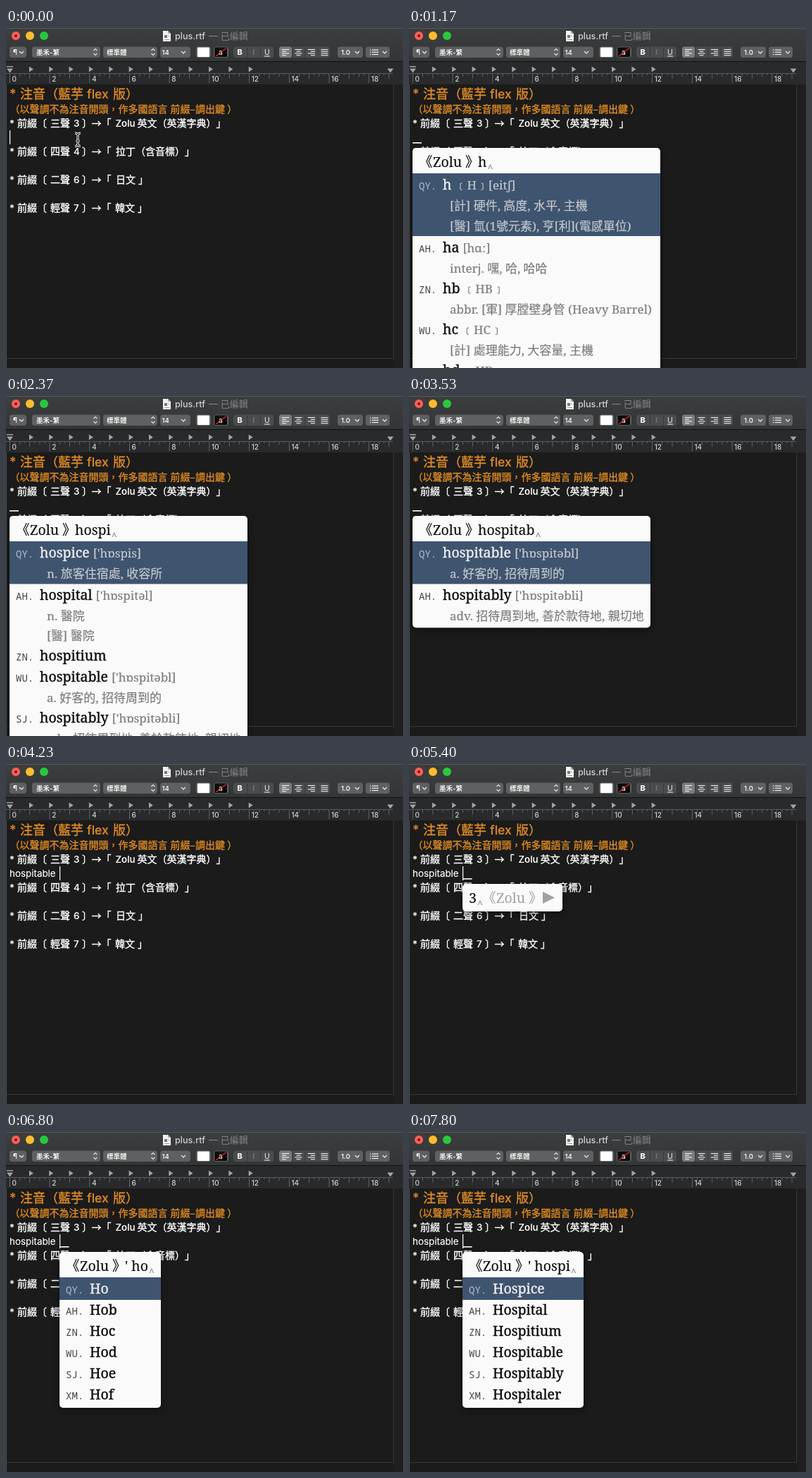
An HTML page for the animation above (8 s loop, 564 by 482 pixels).

```html
<!DOCTYPE html>
<html lang="zh-Hant">
<head>
<meta charset="utf-8">
<style>
html, body { margin: 0; width: 100%; height: 100%; overflow: hidden; background: #1b1b1b; }
svg { display: block; width: 564px; height: 482px; }
text { white-space: pre; text-spacing-trim: space-all; stroke-width: 0; }
.ui { font-family: Inter, 'Noto Sans CJK TC', 'Noto Sans CJK', sans-serif; }
.doc { font: 500 13.4px Inter, 'Noto Sans CJK TC', 'Noto Sans CJK', sans-serif; stroke-width: .15px; }
.cjk { font: 500 14px 'Noto Sans CJK TC', 'Noto Sans CJK', sans-serif; stroke-width: .35px; }
.pop { font-family: 'Noto Serif', 'Noto Sans CJK TC', 'Noto Sans CJK', serif; font-size: 19.5px; stroke-width: .1px; }
.word { stroke-width: .35px; }
.note { font-size: 17px; stroke-width: .2px; }
.key { font: 14px 'Noto Sans Mono', monospace; }
</style>
</head>
<body>
<svg id="stage" viewBox="0 0 564 482"></svg>
<script>
const NAME = 'Zolu';
const KEYS = ['QY.', 'AH.', 'ZN.', 'WU.', 'SJ.', 'XM.'];
const LOOP = 8000;

const rect = (x, y, w, h, fill, r = 0) =>
  `<rect x="${x}" y="${y}" width="${w}" height="${h}" rx="${r}" fill="${fill}"/>`;
const path = (d, stroke, width = 1, fill = 'none') =>
  `<path d="${d}" stroke="${stroke}" stroke-width="${width}" fill="${fill}"/>`;
const shape = (d, fill) => `<path d="${d}" fill="${fill}"/>`;
const text = (x, y, s, cls, fill, extra = '') =>
  `<text x="${x}" y="${y}" class="${cls}" fill="${fill}" stroke="${fill}" ${extra}>${s}</text>`;
const range = n => [...Array(n).keys()];

// ---- window ----
const down = x => path(`M${x - 3} 33l3 3l3-3`, '#e4e4e4', 1.3);
const upDown = x => path(`M${x - 2.5} 32l2.5-2.5l2.5 2.5M${x - 2.5} 36l2.5 2.5l2.5-2.5`, '#e4e4e4', 1.2);
const pill = (x, end, fill = '#5f6061') => rect(x, 26.5, end - x, 15.5, fill, 3.5);
const label = (x, s, size = 9.5, extra = '') =>
  text(x, 37.8, s, 'ui', '#f2f2f2', `font-size="${size}" font-weight="600" ${extra}`);

function titleBar() {
  const lights = ['#ff5f57', '#febc2e', '#28c840']
    .map((c, i) => `<circle cx="${14 + 20 * i}" cy="11" r="6" fill="${c}"/>`).join('');
  return `<defs><linearGradient id="bar" x2="0" y2="1">
    <stop stop-color="#3c3d3e"/><stop offset="1" stop-color="#343536"/></linearGradient></defs>` +
    rect(0, 0, 564, 48, 'url(#bar)') + rect(0, 0, 564, 1, '#58595a') +
    lights + '<circle cx="14" cy="11" r="2" fill="#7c120c"/>' +
    shape('M223 4h7l4 4v11h-11z', '#f2f2f2') + shape('M230 4v4h4z', '#aaa') +
    rect(225, 10, 4, 4, '#777') + path('M225 16.5h7M230 11.5h2', '#999') +
    text(240, 15.8, 'plus.rtf', 'ui', '#d2d2d2', 'font-size="12.6" font-weight="500"') +
    text(288, 15.8, '— 已編輯', 'ui', '#828384', 'font-size="13"');
}

function alignIcon(x, kind) {
  return range(4).map(i => {
    const w = i % 2 && kind < 3 ? 6 : 10;
    const dx = [0, (10 - w) / 2, 10 - w, 0][kind];
    return rect(x + dx, 30 + i * 2.7, w, 1.1, '#eee');
  }).join('');
}

function toolBar() {
  return pill(5, 29) + label(10, '¶', 10) + down(22) +
    pill(37, 134) + label(43, '墨禾-繁') + upDown(127) +
    pill(138, 215) + label(143, '標準體') + upDown(209) +
    pill(219, 262) + label(221.5, '14') + down(252) +
    pill(270, 291) + rect(272, 27.5, 17, 13.5, '#fff', 1) +
    pill(295, 316) + rect(296.5, 27.5, 17.5, 13.5, '#0b0b0b', 1) +
    label(302, 'a', 10) + path('M298 40l15-11.5', '#e0372c', 1.2) +
    pill(323, 380, '#4b4c4d') + rect(342, 27, 1, 15, '#38393a') + rect(361, 27, 1, 15, '#38393a') +
    label(328.5, 'B', 11, 'style="font-weight:800"') +
    text(350, 38, 'I', 'ui', '#858687', 'font-size="11" font-style="italic"') +
    text(367, 37.6, 'U', 'ui', '#eee', 'font-size="10.5"') + rect(367, 39.5, 8, 1, '#eee') +
    pill(388, 460, '#4b4c4d') + pill(388, 406, '#7b7c7d') +
    range(4).map(i => alignIcon(392 + i * 18.5, i)).join('') +
    range(3).map(i => rect(406 + i * 18.3, 27, 1, 15, '#38393a')).join('') +
    pill(471, 507) + label(476, '1.0') + down(499) +
    pill(511, 545) +
    range(3).map(i => rect(517, 30.5 + i * 3.2, 1.5, 1.3, '#eee') + rect(520, 30.5 + i * 3.2, 9, 1.2, '#eee')).join('') +
    down(538);
}

function ruler() {
  const cm = 28.35, grey = '#a2a3a4';
  let out = rect(0, 47, 564, 1, '#111') + rect(0, 48, 564, 32, '#292a2b') +
    rect(0, 64, 550, 1, '#595a5b');
  for (let i = 0; i <= 76; i++) {
    const len = i % 8 ? (i % 4 ? (i % 2 ? 2 : 4) : 7) : 13;
    out += rect((5 + i * cm / 4).toFixed(1), 65, 0.8, len, '#707172');
  }
  for (let i = 0; i < 10; i++)
    out += text(8.5 + i * 2 * cm, 76, i * 2, 'ui', '#d4d4d4', 'font-size="10" font-weight="500"');
  for (let i = 1; i <= 12; i++)
    out += shape(`M${5 + i * cm - 0.5} 54.5l6 4l-6 4z`, grey);
  return out + rect(1, 54, 9, 1.5, grey) + shape('M1 57.5h9l-4.5 6z', grey) +
    shape('M541.5 57.5h9l-4.5 6z', grey);
}

function prefixLine(y, tone, parts) {
  const cjk = (x, s) => text(x, y, s, 'cjk', '#fff');
  return text(5, y, '*', 'doc', '#fff') + cjk(16, '前綴〔') + cjk(63, tone[0]) +
    text(96, y, tone[1], 'doc', '#fff') + cjk(108, '〕') + cjk(121.5, '→') + cjk(135.5, '「') + parts;
}

function page() {
  const orange = '#e08b24', cjk = (x, y, s) => text(x, y, s, 'cjk', '#fff');
  const big = 'style="font-size:18px"';
  return rect(0, 80, 564, 402, '#1b1b1b') + rect(551, 80, 13, 402, '#1f1f1f') +
    rect(550, 80, 1, 389, '#363636') + rect(0, 468, 551, 1, '#363636') +
    text(5, 100, '*', 'doc', orange, big) + text(20, 99.5, '注音（藍芋', 'cjk', orange, big) +
    text(115, 99.5, 'flex', 'doc', orange, 'style="font-size:17.5px"') +
    text(152, 99.5, '版）', 'cjk', orange, big) +
    text(5.5, 120, '（以聲調不為注音開頭，作多國語言', 'cjk', orange) +
    text(233.5, 120, '前綴–調出鍵 ）', 'cjk', orange) +
    prefixLine(140, ['三聲', 3], text(155.5, 140, NAME, 'doc', '#fff') + cjk(186.5, 140, '英文（英漢字典）」')) +
    prefixLine(180, ['四聲', 4], cjk(156, 180, '拉丁（含音標）」')) +
    prefixLine(220, ['二聲', 6], cjk(156, 220, '日文') + cjk(188, 220, '」')) +
    prefixLine(260, ['輕聲', 7], cjk(155, 260, '韓文') + cjk(187, 260, '」')) +
    rect(0, 0, 1, 482, '#4a4b4c');
}

// ---- candidate popup; entry: [word, comment, ...definitions] ----
const hospital = ['hospital', "['hɒspitəl]", 'n. 醫院', '[醫] 醫院'];
const hospice = ['hospice', "['hɒspis]", 'n. 旅客住宿處, 收容所'];
const hospitable = ['hospitable', "['hɒspitəbl]", 'a. 好客的, 招待周到的'];
const hospitably = ['hospitably', "['hɒspitəbli]", 'adv. 招待周到地, 善於款待地, 親切地'];
const hospitium = ['hospitium', ''];
const plain = s => s.split(' ').map(w => [w, '']);

const hList = [
  ['h', '﹝H﹞[eitʃ]', '[計] 硬件, 高度, 水平, 主機', '[醫] 氫(1號元素), 亨[利](電感單位)'],
  ['ha', '[hɑː]', 'interj. 嘿, 哈, 哈哈'],
  ['hb', '﹝HB﹞', 'abbr. [軍] 厚膛壁身管 (Heavy Barrel)'],
  ['hc', '﹝HC﹞', '[計] 處理能力, 大容量, 主機'],
  ['hd', '﹝HD﹞', '[計] 硬碟']];
const hoList = [
  ['ho', '[həu]', 'interj. 嗬, 嗨'], ['hoar', '[hɔː]', 'a. 灰白的', 'n. 白霜'],
  ['hoard', '[hɔːd]', 'n. 儲藏, 貯藏物'], ['hoarse', '[hɔːs]', 'a. 嘶啞的, 刺耳的']];
const hosList = [
  ['hose', '[həuz]', 'n. 長統襪, 軟管', 'vt. 用軟管澆水'], ['hosier', "['həuziə]", 'n. 襪商'],
  ['hosiery', "['həuziəri]", 'n. 襪類, 針織品'], hospice];
const hospList = [hospice, hospital, hospitium, hospitable, hospitably];
const capsList = plain('Hospice Hospital Hospitium Hospitable Hospitably Hospitaler');

// start time, x, width, input, entries; an empty input shows the prefix hint
const states = [
  [0],
  [470, 5, 142, ''],
  [970, 5, 352, 'h', hList],
  [1700, 5, 300, 'ho', hoList],
  [1930, 5, 300, 'hos', hosList],
  [2130, 5, 338, 'hosp', hospList],
  [2340, 5, 338, 'hospi', hospList],
  [2600, 5, 338, 'hospit', [hospital, hospitium, hospitable, hospitably, ['hospitaler', '']]],
  [2950, 5, 338, 'hospita', [hospital, hospitable, hospitably, ['hospitaler', ''], ['hospitalism', '', 'n. 醫院制度']]],
  [3430, 5, 338, 'hospitab', [hospitable, hospitably]],
  [3740, 5, 338, 'hospitabl', [hospitable, hospitably]],
  [4000, 5, 252, 'hospitable', [hospitable]],
  [4230],
  [5370, 76, 142, ''],
  [5970, 76, 144, "'", plain('A Ab Ac Ad Ae Af')],
  [6530, 76, 144, "' h", plain('H Ha Hb Hc Hd He')],
  [6750, 76, 144, "' ho", plain('Ho Hob Hoc Hod Hoe Hof')],
  [6970, 76, 152, "' hos", plain('Hos Hosana Hose Hosea Hosed Hosel')],
  [7200, 76, 172, "' hosp", capsList],
  [7570, 76, 172, "' hospi", capsList]];

const mark = '<tspan dy="6.5" dx="1" font-size="14" fill="#888">^</tspan>';
const ink = '#0a0a0a';

function candidate(x, y, key, [word, comment, ...defs], on) {
  const soft = on ? '#c3c8ce' : '#7c7c7c';
  const bar = on ? rect(x, y - 1, '100%', 32 + defs.length * 28.5, '#3f546f') : '';
  return bar + text(x + 9, y + 22, key, 'key', on ? '#b4bdc8' : '#444') +
    text(x + 43, y + 22,
      `${word}<tspan class="note" dx="5" fill="${soft}" stroke="${soft}">${comment}</tspan>`,
      'pop word', on ? '#f0f0f0' : ink) +
    defs.map((d, k) => text(x + 53, y + 51 + k * 28.5, d, 'pop note', soft)).join('');
}

function popup([, x, w, input, list = []]) {
  if (!x) return '';
  let body = '', y = 207;
  list.forEach((entry, i) => {
    body += candidate(x, y, KEYS[i], entry, !i);
    y += 30 + (entry.length - 2) * (i ? 28 : 29.5);
  });
  const quote = (qx, fill) => text(qx, 197, '《', 'pop', fill) +
    text(qx + 20, 197, NAME, 'pop', fill) + text(qx + 66, 197, '》', 'pop', fill);
  const head = input
    ? quote(x + 9, ink) + text(x + 93, 197, input + mark, 'pop', ink)
    : text(x + 9, 197, '3' + mark, 'pop', ink) + quote(x + 28, '#a6a6a6') +
      shape(`M${x + 114} 181l17 8.5l-17 8.5z`, '#a0a0a0');
  const h = (list.length ? y + 4 : 209) - 170;
  return `<clipPath id="clip">${rect(x, 170, w, h, '#fff', 5)}</clipPath>
    <g style="filter:drop-shadow(0 3px 5px rgba(0,0,0,.45))">${rect(x, 170, w, h, '#fafafa', 5)}</g>
    <g clip-path="url(#clip)">${body}${head}</g>`;
}

// ---- animation ----
const beam = 'M98 149q4 0 4 3.5v11.5q0 3.5-4 3.5M106 149q-4 0-4 3.5M102 164q0 3.5 4 3.5M99.5 160h5';
const stage = document.getElementById('stage');
stage.innerHTML = page() + titleBar() + toolBar() + ruler() +
  `<g id="typed">${text(5, 160, 'hospitable', 'doc', '#fff', 'style="font-weight:400"')}</g>
  <rect id="caret" y="145" width="1.2" height="20" fill="#fff"/>
  <rect id="under" y="162" width="13" height="1.6" fill="#fff"/>
  <g id="mouse">${path(beam, '#fff', 3)}${path(beam, '#111', 1.1)}</g>
  <g id="popup"></g>`;
const [typed, caret, under, mouse, box] =
  ['typed', 'caret', 'under', 'mouse', 'popup'].map(id => document.getElementById(id));
const show = (el, on) => el.setAttribute('visibility', on ? 'visible' : 'hidden');
const clamp = v => Math.max(0, Math.min(1, v));

function caretAlpha(t) {
  if (t < 4230) return 1 - clamp((t - 30) / 170);
  return clamp(Math.max((4960 - t) / 160, (t - 5040) / 160));
}

let current;
function draw(t) {
  const state = states.findLast(s => s[0] <= t);
  if (state !== current) {
    current = state;
    box.innerHTML = popup(state);
  }
  const done = t >= 4230;
  show(typed, done);
  show(mouse, t < 470);
  show(under, state.length > 1);
  under.setAttribute('x', done ? 76.5 : 5);
  caret.setAttribute('x', done ? 76 : 5);
  caret.setAttribute('opacity', caretAlpha(t));
}

const start = performance.now();
function tick() {
  draw((performance.now() - start) % LOOP);
  requestAnimationFrame(tick);
}
tick();
</script>
</body>
</html>
```
